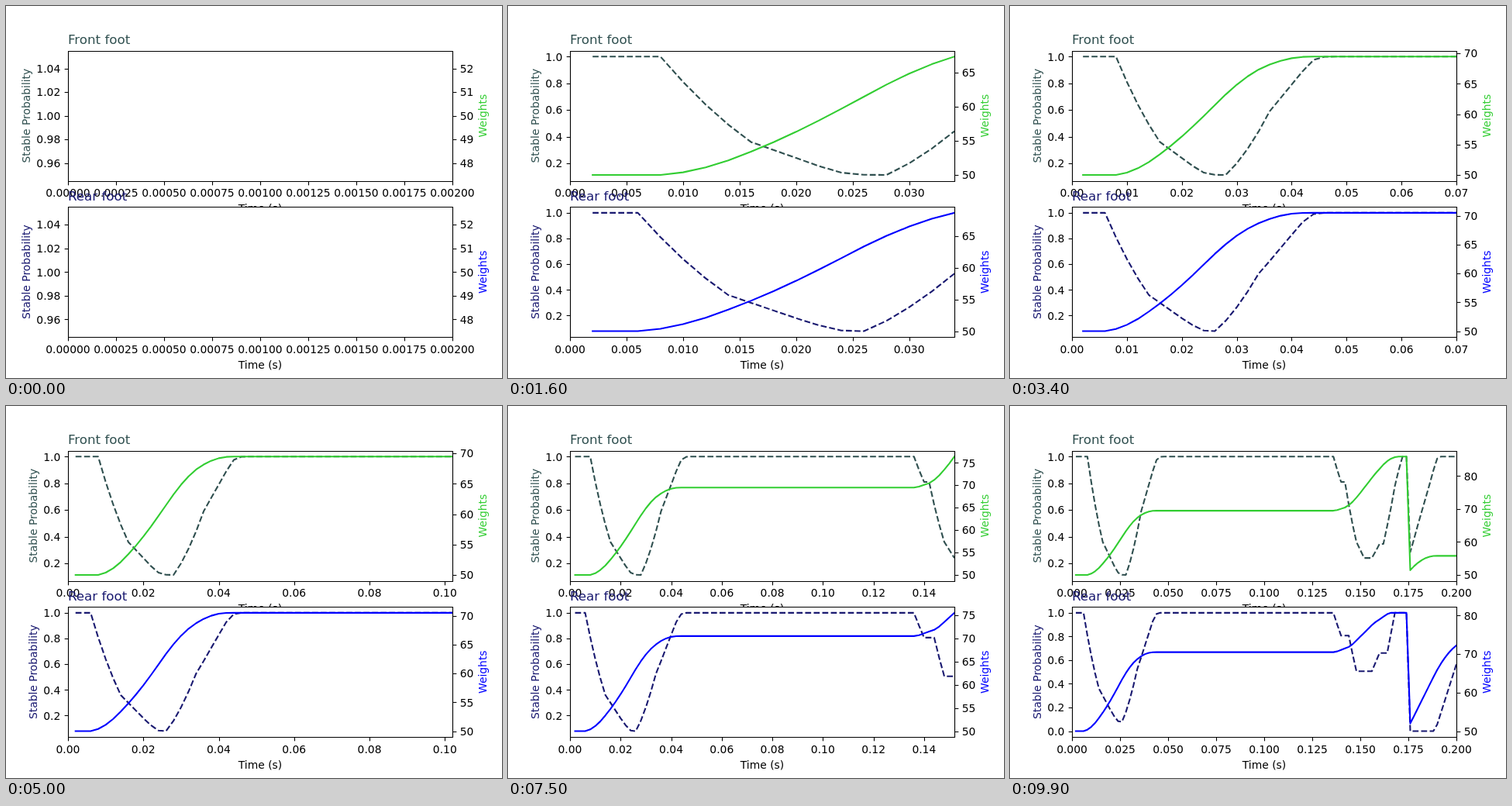
An HTML page that plays this animation: 640 by 480 pixels, repeating every 10000 ms.

```html
<!DOCTYPE html>
<html lang="en">
<head>
<meta charset="utf-8">
<title>Foot stability</title>
<style>
  html, body { margin: 0; width: 100%; height: 100%; overflow: hidden; background: #fff; }
  svg { display: block; }
  text { font: 13.889px "DejaVu Sans", sans-serif; white-space: pre; }
  .title { font-size: 16.667px; }
  .axis { fill: none; stroke: #000; stroke-width: 1.11; }
  .curve { fill: none; stroke-width: 2.083; stroke-linejoin: round; }
  .solid { stroke-linecap: square; }
  .dashed { stroke-dasharray: 7.708 3.333; }
</style>
</head>
<body>
<svg id="stage" width="640" height="480" viewBox="0 0 640 480"></svg>
<script>
const STEPS = 100, STEP_MS = 100, DT = 0.002, RESET_AT = 88;
const LEFT = 80, RIGHT = 576, HEIGHT = 168;
const TICK = 4.86, LABEL_GAP = 9.72, LABEL_PAD = 5.56, ASCENT = 11, DESCENT = 3;

// Probability is 1 except in the listed runs, keyed by their first step.
function probabilities(runs) {
  const p = Array(STEPS).fill(1);
  for (const [first, values] of Object.entries(runs))
    values.forEach((v, i) => { p[first - 1 + i] = v; });
  return p;
}

// Weight grows with instability and starts over at the reset.
function weights(p) {
  let w = 50;
  return p.map((v, i) => {
    if (i + 1 === RESET_AT) w = 50;
    return w += 2 * (1 - v);
  });
}

const front = probabilities({
  5: [.81, .64, .49, .36, .3, .24, .18, .13, .114, .113, .2, .31, .44, .59, .69, .79, .89, .975, .998],
  69: [.9, .81, .81, .64, .49, .36, .3, .24, .24, .24, .29, .345, .345, .48, .62, .78, .9],
  88: [.285, .385, .49, .59, .69, .79, .895, .985]
});
const rear = probabilities({
  4: [.81, .64, .49, .36, .3, .24, .18, .125, .084, .079, .16, .265, .388, .527, .625, .727, .828, .928, .99],
  69: [.9, .807, .807, .807, .65, .506, .506, .506, .506, .506, .583, .66, .66, .66, .83],
  88: [0, 0, 0, 0, 0, 0, 0, .056, .158, .26, .362, .464, .566]
});

const panels = [
  { id: "front", top: 57.6, title: "Front foot", dark: "#2f4f4f", bright: "#32cd32", p: front, w: weights(front) },
  { id: "rear", top: 259.2, title: "Rear foot", dark: "#191970", bright: "#0000ff", p: rear, w: weights(rear) }
];

const snap = v => Math.round(v) + 0.5;

function ticks(lo, hi, bins) {
  const raw = (hi - lo) / bins * (1 - 1e-9);
  const unit = 10 ** Math.floor(Math.log10(raw));
  const mult = [1, 2, 2.5, 5, 10].find(m => m * unit >= raw);
  const step = mult * unit;
  const digits = Math.max(0, (mult === 2.5) - Math.floor(Math.log10(step) + 1e-9));
  const list = [];
  for (let k = Math.ceil(lo / step - 1e-6); k <= hi / step + 1e-6; k++)
    list.push({ value: k * step, label: (k * step).toFixed(digits) });
  return list;
}

function limits(values) {
  let lo = Math.min(...values), hi = Math.max(...values);
  if (hi - lo < 1e-9) { lo *= 0.95; hi *= 1.05; }
  const margin = (hi - lo) * 0.05;
  return [lo - margin, hi + margin];
}

const textWidth = s => [...s].reduce((sum, c) => sum + (c === "." ? 4.415 : 8.837), 0);

const text = (s, x, y, anchor, fill = "#000", cls = "") =>
  `<text x="${x}" y="${Math.round(y)}" text-anchor="${anchor}" fill="${fill}" class="${cls}">${s}</text>`;

const sideText = (s, x, y, fill) =>
  `<text transform="translate(${Math.round(x)} ${y}) rotate(-90)" text-anchor="middle" fill="${fill}">${s}</text>`;

const axisPath = d => `<path class="axis" d="${d}"/>`;

function curve(values, toX, toY, color, style, clip) {
  if (values.length < 2) return "";
  const flat = values.every(v => v === values[0]);
  const points = values.map((v, i) => {
    const y = toY(v);
    return `${toX((i + 1) * DT).toFixed(2)},${flat ? Math.round(y) : y.toFixed(2)}`;
  });
  return `<g clip-path="url(#${clip})"><polyline class="curve ${style}" stroke="${color}" points="${points.join(" ")}"/></g>`;
}

function yAxis(values, panel, onRight) {
  const [lo, hi] = limits(values);
  const toY = v => panel.top + HEIGHT * (hi - v) / (hi - lo);
  const list = ticks(lo, hi, 6);
  const edge = onRight ? RIGHT : LEFT, dir = onRight ? 1 : -1;
  const widest = Math.max(...list.map(t => textWidth(t.label)));
  const reach = edge + dir * (LABEL_GAP + widest + LABEL_PAD);
  const middle = panel.top + HEIGHT / 2;
  let out = "";
  for (const t of list) {
    const y = toY(t.value);
    out += axisPath(`M${edge + 0.5} ${snap(y)}h${dir * TICK}`);
    out += text(t.label, edge + dir * LABEL_GAP, y + 5.3, onRight ? "start" : "end");
  }
  out += onRight
    ? sideText("Weights", reach + ASCENT, middle, panel.bright)
    : sideText("Stable Probability", reach - DESCENT, middle, panel.dark);
  return { toY, markup: out };
}

function drawPanel(panel, count) {
  const { top, id } = panel, bottom = top + HEIGHT, end = count * DT;
  const toX = t => LEFT + (RIGHT - LEFT) * t / end;
  const p = panel.p.slice(0, count), w = panel.w.slice(0, count);
  const left = yAxis(p, panel, false), right = yAxis(w, panel, true);
  const box = `x="${LEFT}" y="${top}" width="${RIGHT - LEFT}" height="${HEIGHT}"`;
  let out = `<clipPath id="${id}"><rect ${box}/></clipPath><rect ${box} fill="#fff"/>`;
  for (const t of ticks(0, end, 9)) {
    const x = toX(t.value);
    out += axisPath(`M${snap(x)} ${snap(bottom)}v${TICK}`);
    out += text(t.label, x, bottom + LABEL_GAP + ASCENT, "middle");
  }
  out += text("Time (s)", (LEFT + RIGHT) / 2, bottom + 40.3, "middle");
  out += left.markup + right.markup;
  out += curve(p, toX, left.toY, panel.dark, "dashed", id);
  out += curve(w, toX, right.toY, panel.bright, "solid", id);
  out += axisPath(`M${LEFT + 0.5} ${snap(top)}H${RIGHT + 0.5}V${snap(bottom)}H${LEFT + 0.5}Z`);
  return out + text(panel.title, LEFT, top - 8.33, "start", panel.dark, "title");
}

const stage = document.getElementById("stage");
const start = performance.now();
let shown = 0;

function update() {
  const count = Math.floor((performance.now() - start) / STEP_MS) % STEPS + 1;
  if (count !== shown) {
    stage.innerHTML = panels.map(panel => drawPanel(panel, count)).join("");
    shown = count;
  }
  requestAnimationFrame(update);
}
update();
</script>
</body>
</html>
```
